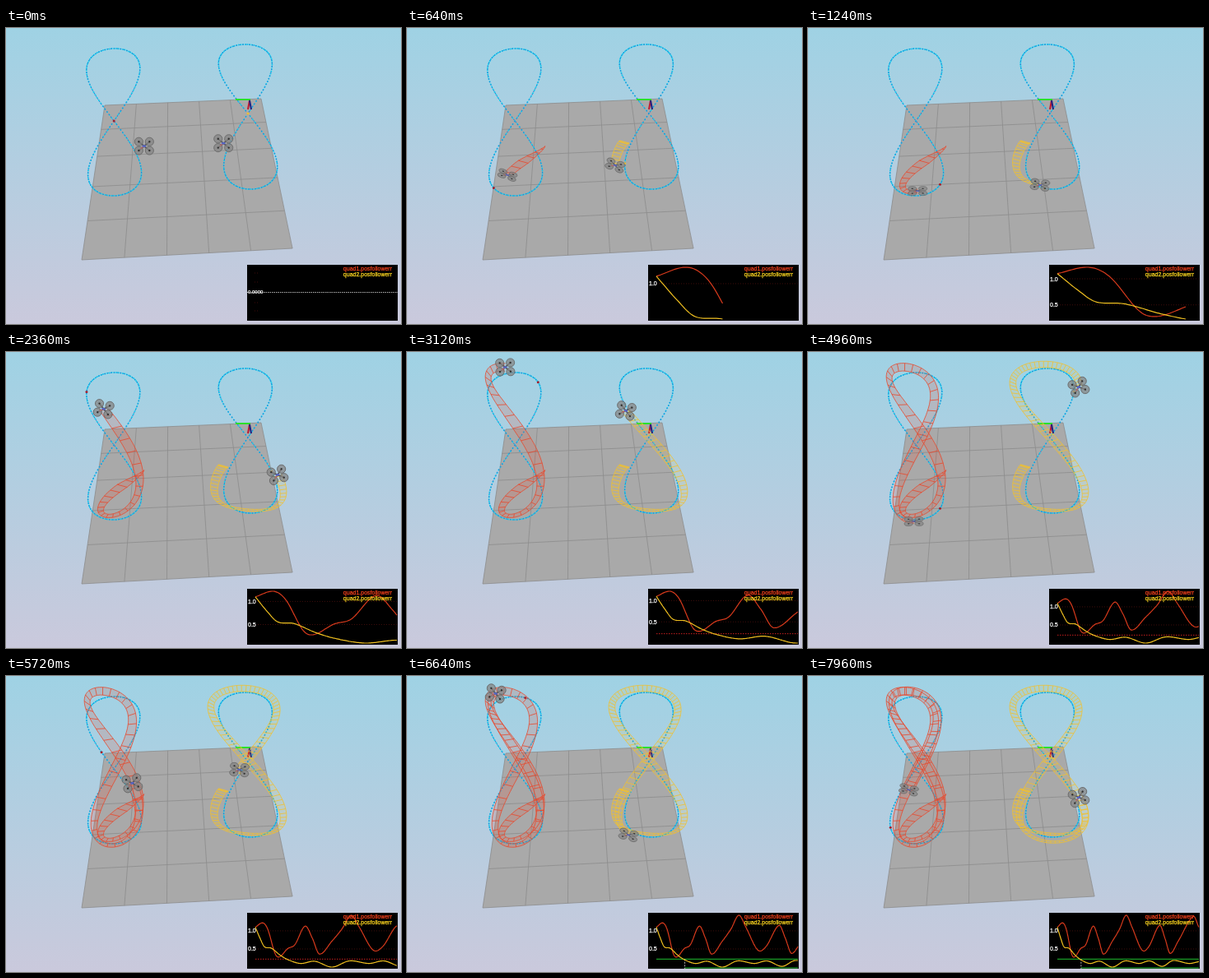
Animation, 480 px wide and 360 px high, one loop 8 s. Source, as an HTML page:

```html
<!DOCTYPE html>
<html lang="en">
<head>
<meta charset="utf-8">
<title>Two quadrotors</title>
<style>
html, body { margin: 0; width: 100%; height: 100%; overflow: hidden; }
svg { display: block; width: 100%; height: 100%; }
text { font: 7px "Liberation Sans", Arial, sans-serif; stroke-width: .25; }
path { fill: none; }
</style>
</head>
<body>
<svg viewBox="0 0 480 360">
  <defs>
    <linearGradient id="sky" x2="0" y2="1">
      <stop offset="0" stop-color="#9fd2e4"/>
      <stop offset="1" stop-color="#cac9dc"/>
    </linearGradient>
    <clipPath id="plot"><rect x="293" y="288" width="183" height="68"/></clipPath>
    <g id="quad">
      <path d="M-6-5L6 5M6-5L-6 5" stroke="#555" stroke-width="1.6"/>
      <g fill="#858585" fill-opacity=".75" stroke="#686868" stroke-width=".8">
        <circle cx="-6" cy="-5" r="4.7"/><circle cx="6" cy="-5" r="4.7"/>
        <circle cx="-6" cy="5" r="4.7"/><circle cx="6" cy="5" r="4.7"/>
      </g>
      <path d="M-6-5h0M6-5h0M-6 5h0M6 5h0" stroke="#333" stroke-width="2.2" stroke-linecap="round"/>
      <path d="M-4 3L0 0" stroke="#c66"/>
      <path d="M-2 0H2" stroke="#56c" stroke-width="2"/>
    </g>
  </defs>
  <rect width="480" height="360" fill="url(#sky)"/>
  <path d="M120 94L310 86L348 268L92 282Z" style="fill:#a9a9a9"/>
  <path id="grid" stroke="#8c8c8c" stroke-width=".8"/>
  <g id="refs"></g>
  <path d="M279 87H297" stroke="#2be02b" stroke-width="2"/>
  <path d="M296 88L294 99" stroke="#c01830" stroke-width="2"/>
  <path d="M296 88L298 99" stroke="#202080" stroke-width="2"/>
  <g id="scene"></g>
  <rect x="293" y="288" width="183" height="68"/>
  <g clip-path="url(#plot)">
    <path id="ticks" stroke="#5a1410" stroke-width=".7" stroke-dasharray="1 2"/>
    <path id="limit" stroke-width="1"/>
    <path id="settled" stroke="#ddd" stroke-width=".8" stroke-dasharray="2 1.5"/>
    <path id="zero" d="M293 321.5H476" stroke="#ddd" stroke-width=".8" stroke-dasharray="1.5 1"/>
    <path id="err0" stroke="#d83a1c" stroke-width="1.2"/>
    <path id="err1" stroke="#f0c020" stroke-width="1.2"/>
    <g fill="#fff" stroke="#fff">
      <text id="one" x="294">1.0</text>
      <text id="half" x="294">0.5</text>
      <text id="none" x="294" y="323" style="font-size:6px">0.0000</text>
    </g>
    <text x="469" y="295" text-anchor="end" fill="#f0401c" stroke="#f0401c">quad1.posfollowerr</text>
    <text x="469" y="302" text-anchor="end" fill="#ffd820" stroke="#ffd820">quad2.posfollowerr</text>
  </g>
</svg>
<script>
const LOOP = 8000, STEP = 40, TAU = Math.PI * 2;
const { sin, cos, exp, min, max } = Math;
const $ = id => document.getElementById(id);
const add = (parent, tag, attrs) => {
  const el = document.createElementNS('http://www.w3.org/2000/svg', tag);
  for (const k in attrs) el.setAttribute(k, attrs[k]);
  return parent.appendChild(el);
};
const pt = p => p[0].toFixed(1) + ' ' + p[1].toFixed(1);
const line = pts => pts.length ? 'M' + pts.map(pt).join('L') : '';

// Floor in perspective
const floor = (u, v) => {
  const g = .013, h = -.26, w = 1 + g * u + h * v;
  return [(120 + (190 + g * 310) * u + (-28 + h * 92) * v) / w,
          (94 + (-8 + g * 86) * u + (188 + h * 282) * v) / w];
};
let grid = '';
for (let i = 0; i < 6; i++) {
  const k = i / 5;
  grid += line([floor(k, 0), floor(k, 1)]) + line([floor(0, k), floor(1, k)]);
}
$('grid').setAttribute('d', grid);

// Figure eight; skew shifts the sideways swing against the vertical one
const eight = (s, a) => {
  const v = sin(a), u = sin(2 * a - s.skew);
  return [s.x + s.lean * v - s.w * u, s.y + s.h * v + s.bend * v * v + s.tilt * u];
};

// Each craft flies its own eight behind the goal, after a fading start-up swing
const crafts = [
  {
    color: '#e8482c', dot: '#a02030', period: 3720, rung: 100, fill: .18,
    ref: { x: 131.2, y: 113, w: 32.5, h: 89.5, lean: 1.3, bend: 1.5, tilt: 1.5, skew: 0 },
    path: { x: 132, y: 104, w: 27, h: 94, lean: 4.5, bend: 8, tilt: 0, skew: .28 },
    lag: .515, grow: 400, width: 12, rise: 10, squash: .6, narrow: .55,
    swing: t => [12 * exp(-t / 2500) * cos(TAU * t / 7500), 84 * exp(-t / 900) * cos(TAU * t / 4000)]
  },
  {
    color: '#f0c030', dot: '#f0c030', period: 5580, rung: 60, fill: .12,
    ref: { x: 294, y: 104, w: 32.5, h: 88, lean: 4.5, bend: 4, tilt: 1, skew: 0 },
    path: { x: 293, y: 102, w: 40, h: 93.5, lean: 5.7, bend: 6.5, tilt: 0, skew: 0 },
    lag: .03, grow: 1, width: 11, rise: 8, squash: .4, narrow: 0,
    swing: t => [-31 * exp(-t / 330), 41 * exp(-t / 280) - 10 * exp(-(((t - 1350) / 500) ** 2))]
  }
];

function fly(c, t) {
  const a = TAU * t / c.period - c.lag, v = sin(a), p = eight(c.path, a), s = c.swing(t);
  const x = p[0] + s[0], y = p[1] + s[1], k = min(1, t / c.grow) / 2;
  const dx = -c.width * cos(a) * k, dy = (c.rise * v * v - 2.5 * v - 3) * k;
  return { angle: a, x, y, left: [x - dx, y - dy], right: [x + dx, y + dy] };
}

for (const c of crafts) {
  const pts = [];
  for (let i = 0; i <= 150; i++) pts.push(eight(c.ref, TAU * i / 150));
  add($('refs'), 'path', {
    d: pts.map(p => 'M' + pt(p) + 'h0').join(''),
    stroke: '#10cdee', 'stroke-width': 2, 'stroke-linecap': 'round'
  });
  add($('refs'), 'path', { d: line(pts), stroke: '#2482d4', 'stroke-width': 1.1, 'stroke-dasharray': '1.5 2.4' });
  c.goal = add($('scene'), 'circle', { r: 1.5, fill: c.dot });
  c.band = add($('scene'), 'path', { style: `fill:${c.color};fill-opacity:${c.fill}` });
  c.edge = add($('scene'), 'path', { stroke: c.color, 'stroke-width': .8 });
}
for (const c of crafts) c.body = add($('scene'), 'use', { href: '#quad' });

// Smooth curve through [time, value] keys
const slope = (k, i) => {
  const p = k[max(0, i - 1)], n = k[min(k.length - 1, i + 1)];
  return (n[1] - p[1]) / (n[0] - p[0]);
};
const sample = (k, t) => {
  let i = 0;
  while (i < k.length - 2 && t > k[i + 1][0]) i++;
  const d = k[i + 1][0] - k[i][0], s = (t - k[i][0]) / d, r = 1 - s;
  return k[i][1] * r * r * (1 + 2 * s) + k[i + 1][1] * s * s * (3 - 2 * s)
    + d * s * r * (slope(k, i) * r - slope(k, i + 1) * s);
};
const keys = [
  [[0, 1.1], [300, 1.22], [500, 1.05], [860, .3], [1330, .52], [1600, .62], [2010, 1.13],
   [2300, .8], [2590, .36], [3100, .72], [3500, 1.05], [3870, 1.43], [4200, 1.1], [4760, .47],
   [5150, .57], [5750, 1.15], [6050, .8], [6340, .38], [6800, .72], [7640, 1.4], [7960, 1.1]],
  [[0, 1.1], [200, .78], [370, .56], [650, .52], [1000, .33], [1330, .2], [1830, .1],
   [2400, .16], [3100, 0], [3800, .17], [4600, .1], [5200, .17], [5900, .02],
   [6500, .18], [7400, .1], [7960, .15]]
];
const errors = keys.map(k => {
  const out = [];
  for (let t = 0; t < LOOP; t += 20) out.push(sample(k, t));
  return out;
});

function drawCraft(c, t) {
  const goal = eight(c.ref, TAU * t / c.period);
  c.goal.setAttribute('cx', goal[0]);
  c.goal.setAttribute('cy', goal[1]);
  const left = [], right = [];
  let rungs = '';
  for (let s = 0; s <= t; s += 20) {
    const f = fly(c, s);
    left.push(f.left);
    right.push(f.right);
    if (s % c.rung === 0) rungs += line([f.left, f.right]);
  }
  c.edge.setAttribute('d', line(left) + line(right) + rungs);
  c.band.setAttribute('d', line(left.concat(right.reverse())) + 'Z');
  const p = fly(c, t), w = min(1, t / 400), u = sin(2 * p.angle);
  const sx = 1.08 - c.narrow * w * max(0, -u) * max(0, cos(p.angle));
  const sy = 1.08 - c.squash * w * max(0, cos(p.angle - 1.05));
  c.body.setAttribute('transform',
    `translate(${p.x} ${p.y}) rotate(${20 * u * w}) scale(${sx} ${sy})`);
}

function drawPlot(t) {
  const n = t / 20 + 1, data = errors.map(e => e.slice(0, n)), all = data.flat();
  const hi = max(...all), lo = min(...all), k = 63 / max(.05, hi - lo);
  const X = s => 303 + 172 * s / max(1367, t), Y = v => 291 + (hi - v) * k;
  const started = t > 0;
  data.forEach((e, i) =>
    $('err' + i).setAttribute('d', started ? line(e.map((v, j) => [X(j * 20), Y(v)])) : ''));
  $('zero').style.display = $('none').style.display = started ? 'none' : '';
  let ticks = '';
  for (const [id, v] of [['one', 1], ['half', .5]]) {
    const y = Y(v), on = started && y < 355;
    $(id).style.display = on ? '' : 'none';
    $(id).setAttribute('y', y + 2.5);
    if (on) ticks += `M303 ${y}H475`;
  }
  $('ticks').setAttribute('d', started ? ticks : 'M302 298h5M302 309h5M302 334h5M302 344h5');
  const done = t >= 5800, x = X(1335), y = Y(.22), limit = $('limit');
  limit.setAttribute('d', t < 2600 ? '' : `M303 ${y}H475` + (done ? `M${x} 355H475` : ''));
  limit.setAttribute('stroke', done ? '#20c030' : '#c82020');
  limit.setAttribute('stroke-dasharray', done ? 'none' : '1.5 1.5');
  $('settled').setAttribute('d', done ? `M${x} ${y}V356` : '');
}

function draw(t) {
  for (const c of crafts) drawCraft(c, t);
  drawPlot(t);
}

const start = performance.now();
let last = -1;
function tick() {
  const t = Math.floor(max(0, performance.now() - start) % LOOP / STEP) * STEP;
  if (t !== last) draw(last = t);
  requestAnimationFrame(tick);
}
draw(0);
tick();
</script>
</body>
</html>
```
